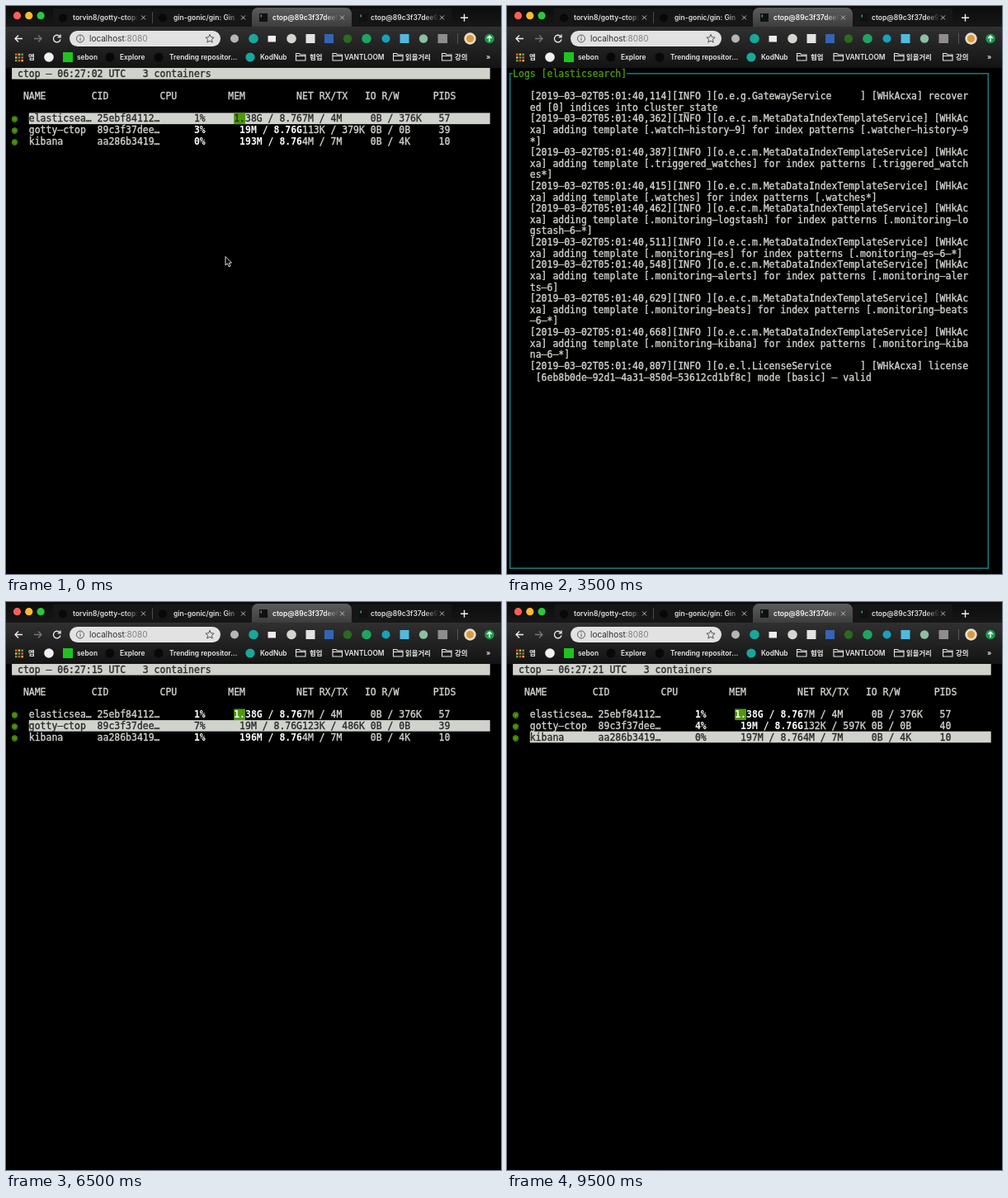
An HTML page with a canvas that plays this animation: 600 by 688 pixels, repeating every 10000 ms.

```html
<!DOCTYPE html>
<html lang="en">
<head>
<meta charset="utf-8">
<title>ctop</title>
<style>
  html, body { margin: 0; width: 100%; height: 100%; overflow: hidden; background: #000; }
  canvas { display: block; }
</style>
</head>
<body>
<canvas id="stage" width="600" height="688"></canvas>
<script>
const ctx = document.getElementById('stage').getContext('2d');
const CW = 6.9, RH = 13.62, LEFT = 0.2, TOP = 75;
const FG = '#d0d3cc', GREEN = '#4e9a06', CYAN = '#16898b', INK = '#2a2a2a';
const SANS = 'Inter, "Noto Sans CJK KR", "Noto Sans CJK", sans-serif';

const colX = c => LEFT + c * CW;
const rowY = r => TOP + r * RH;
const midX = c => colX(c + 0.5);
const midY = r => rowY(r + 0.5);

// ---------- basic shapes ----------
function rect(x, y, w, h, color) {
  ctx.fillStyle = color;
  ctx.fillRect(x, y, w, h);
}
function disc(x, y, r, color) {
  ctx.fillStyle = color;
  ctx.beginPath();
  ctx.arc(x, y, r, 0, 7);
  ctx.fill();
}
function stroke(path, color, width = 1) {
  ctx.strokeStyle = color;
  ctx.lineWidth = width;
  ctx.stroke(new Path2D(path));
}
function label(x, y, text, size, color, weight = 600) {
  ctx.font = `${weight} ${size}px ${SANS}`;
  ctx.fillStyle = color;
  ctx.fillText(text, x, y);
}
function vertical(y0, y1, from, to) {
  const g = ctx.createLinearGradient(0, y0, 0, y1);
  g.addColorStop(0, from);
  g.addColorStop(1, to);
  return g;
}

// ---------- terminal cells ----------
function cells(c, r, n, color, rows = 1) {
  rect(colX(c), rowY(r), n * CW, rows * RH, color);
}
// A hairline outline thickens the strokes; dashes take the wide glyph.
function put(c, r, text, color = FG, bold = false) {
  ctx.font = `${bold ? 'bold ' : ''}11.44px "DejaVu Sans Mono", monospace`;
  ctx.fillStyle = ctx.strokeStyle = color;
  ctx.lineWidth = 0.35;
  [...text.replaceAll('-', '–')].forEach((ch, i) => {
    if (ch === ' ') return;
    ctx.fillText(ch, colX(c + i), rowY(r) + 10.8);
    if (!bold) ctx.strokeText(ch, colX(c + i), rowY(r) + 10.8);
  });
}
function box(c0, r0, c1, r1, color, title = '') {
  ctx.strokeStyle = color;
  ctx.lineWidth = 1.4;
  ctx.strokeRect(midX(c0), midY(r0), (c1 - c0) * CW, (r1 - r0) * RH);
  cells(c0 + 1, r0, title.length, '#000');
  put(c0 + 1, r0, title, GREEN);
}

// ---------- browser window ----------
function tab(x, title, textX, active) {
  if (active) {
    ctx.fillStyle = vertical(2, 26, '#5c5c5c', '#3c3c3c');
    ctx.beginPath();
    ctx.roundRect(x, 2, 121, 24, [7, 7, 0, 0]);
    ctx.fill();
  }
  const fade = ctx.createLinearGradient(x + 88, 0, x + 105, 0);
  fade.addColorStop(0, active ? '#f4f4f4' : '#dcdcdc');
  fade.addColorStop(1, 'rgba(220,220,220,0)');
  label(textX, 17, title, 8.5, fade);
  stroke(`M${x + 107} 11.5l5 5m0 -5l-5 5`, '#bbb');
}
function folder(x) {
  stroke(`M${x} 57.5h4l1.5 1.5h6v7h-11.5zM${x} 60.5h11.5`, '#e4e4e4', 1.1);
}
function bookmark(x, text) {
  label(x, 65, text, 8.4, '#e8e8e8');
}

function browser() {
  rect(0, 0, 600, 26, vertical(0, 26, '#0c0c0c', '#171717'));
  ['#ff5f57', '#febc2e', '#28c840'].forEach((c, i) => disc(13.5 + i * 14.3, 11.7, 4.6, c));
  rect(57, 3, 120, 23, '#161616');
  rect(178, 3, 120, 23, '#161616');
  rect(419, 3, 121, 23, '#161616');
  rect(177, 7, 1, 14, '#4a4a4a');
  tab(57, 'torvin8/gotty-ctop:', 81, false);
  tab(178, 'gin-gonic/gin: Gin', 203, false);
  tab(298, 'ctop@89c3f37dee9', 323, true);
  tab(419, 'ctop@89c3f37dee9', 442, false);
  disc(69, 14.5, 5, '#080808');
  disc(190, 14.5, 5, '#080808');
  for (const x of [307, 428]) {
    rect(x, 9, 10, 10, '#111');
    rect(x + 1.5, 10.5, 1.5, 3, '#3aa76d');
  }
  stroke('M551 14.3h9M555.5 9.8v9', '#eee', 1.4);

  rect(0, 25, 600, 50, vertical(25, 75, '#303030', '#131313'));
  stroke('M20 39.5h-9M15 35.5l-4 4l4 4', '#eee', 1.3);
  stroke('M34 39.5h9M39 35.5l4 4l-4 4', '#777', 1.3);
  stroke('M65.4 37.2a4.3 4.3 0 1 0 .6 3.2', '#eee', 1.3);
  stroke('M66 34.5v3.4h-3.4', '#eee', 1.3);
  ctx.fillStyle = '#e2e2e2';
  ctx.beginPath();
  ctx.roundRect(77, 30, 183, 19, 9.5);
  ctx.fill();
  stroke('M94.5 39.5a4.5 4.5 0 1 0 -9 0a4.5 4.5 0 1 0 9 0M90 38.8v3.2M90 36.6v1.2', '#555');
  label(101, 43, 'localhost', 10, '#2d2d2d', 400);
  const hostWidth = ctx.measureText('localhost').width;
  label(101 + hostWidth, 43, ':8080', 10, '#808080', 400);
  stroke('M247 34.4l1.5 3.4l3.6 .3l-2.7 2.4l.8 3.6l-3.2 -1.9l-3.2 1.9l.8 -3.6l-2.7 -2.4l3.6 -.3z', '#555');

  disc(277, 39.5, 5, '#b5b5b5');
  disc(300, 39.5, 5.8, '#18a79b');
  rect(317.5, 36, 9.5, 7.5, '#eee');
  disc(346, 39.5, 5.8, '#d4d6d0');
  rect(363.5, 34, 11, 11, '#e2e2e2');
  rect(386, 34, 11, 11, '#3563b5');
  disc(414, 39.5, 5.2, '#2c6a1f');
  disc(437, 39.5, 5.8, '#1fa463');
  disc(460.5, 39.5, 5, '#15a3bd');
  rect(477.5, 34, 11, 11, '#52b9df');
  disc(506, 39.5, 5.2, '#8cc0a0');
  rect(523.5, 34, 11.5, 11, '#8d8d8d');
  rect(547, 33, 1, 13, '#555');
  disc(562.5, 39.5, 7.2, '#e9dfc9');
  disc(562.5, 39.5, 4.5, '#d99a3c');
  disc(586, 39.5, 5.8, '#1c9a4c');
  stroke('M586 43v-6.5M583.2 39l2.8 -2.8l2.8 2.8', '#fff', 1.4);

  const dots = ['#e5533d', '#e8b33a', '#58a55c'];
  for (let i = 0; i < 9; i++) {
    const row = Math.floor(i / 3);
    rect(11 + (i % 3) * 3.7, 57.5 + row * 3.7, 2.5, 2.5, dots[(i + row) % 3]);
  }
  disc(52, 62, 5.8, '#f1f1f1');
  rect(69, 56, 12, 12, '#1ec41e');
  disc(126, 62, 5.5, '#080808');
  disc(185, 62, 5.5, '#080808');
  disc(296, 62, 5.6, '#18a79b');
  [351.5, 396, 469.5, 528.5].forEach(folder);
  bookmark(27, '앱');
  bookmark(86, 'sebon');
  bookmark(138, 'Explore');
  bookmark(198, 'Trending repositor…');
  bookmark(308, 'KodNub');
  bookmark(368, '협업');
  bookmark(410, 'VANTLOOM');
  bookmark(484, '읽을거리');
  bookmark(544, '강의');
  bookmark(582, '»');
}

// ---------- container list ----------
function list(sec, selected, cpu, net, kibanaMem, pids = 39) {
  cells(1, 0, 84, FG);
  put(2, 0, `ctop - 06:27:${String(sec).padStart(2, '0')} UTC   3 containers`, INK);
  const heads = ['NAME', 'CID', 'CPU', 'MEM', 'NET RX/TX', 'IO R/W', 'PIDS'];
  heads.forEach((h, i) => put(3 + 12 * i, 2, h));
  const rows = [
    ['elasticsea…', '25ebf84112…', '1.38G / 8.76', '7M / 4M', '0B / 376K', 57],
    ['gotty-ctop', '89c3f37dee…', ' 19M / 8.76G', net, '0B / 0B', pids],
    ['kibana', 'aa286b3419…', ` ${kibanaMem}M / 8.76`, '4M / 7M', '0B / 4K', 10],
  ];
  rows.forEach(([name, cid, mem, traffic, io, procs], i) => {
    const r = 4 + i, on = i === selected;
    const color = on ? INK : FG, strong = on ? INK : '#fff';
    put(1, r, '◉', GREEN);
    if (on) cells(4, r, 81, FG);
    if (i === 0) cells(40, r, 2, GREEN);
    put(4, r, name, color);
    put(16, r, cid, color);
    put(33, r, cpu[i] + '%', strong, !on);
    put(40, r, mem, strong, !on);
    put(52, r, traffic, color);
    put(64, r, io, color);
    put(76, r, String(procs), color);
  });
}

function menu(selected) {
  cells(1, 0, 19, '#000', 10);
  box(1, 0, 19, 9, CYAN, 'Menu');
  ['single view', 'log view', 'stop', 'pause', 'restart', 'cancel'].forEach((item, i) => {
    const on = i === selected;
    if (on) cells(5, 2 + i, item.length, FG);
    put(5, 2 + i, item, on ? INK : FG);
  });
}

// ---------- single container ----------
const elastic = {
  info: [
    ['id', '25ebf84112c8'], ['name', 'elasticsearch'],
    ['image', 'docker.elastic.co/elasticsearch/elasticsearch:6.4.0'],
    ['ports', '9200/tcp'], ['', '9300/tcp'],
    ['', '0.0.0.0:19200 -> 19200/tcp'], ['', '0.0.0.0:19300 -> 19300/tcp'],
    ['IPs', 'elasticsearch-curator_ek:192.168.32.2'], ['state', 'running'],
    ['created', 'Sat Mar 2 05:01:21 2019'], ['health', ''],
  ],
  mem: '1.38G', gauge: true,
};
const gotty = {
  info: [
    ['id', '89c3f37dee9d'], ['name', 'gotty-ctop'], ['image', 'torvin8/ctop:latest'],
    ['ports', '0.0.0.0:8080 -> 8080/tcp'], ['IPs', 'gotty-ctop_default:192.168.144.2'],
    ['state', 'running'], ['created', 'Sat Mar 2 06:19:48 2019'], ['health', ''],
  ],
  mem: '19M', gauge: false,
};

// Levels 0..7 fill the newest columns; neighbours are joined by vertical runs of dots.
function cpuChart(base, levels, step) {
  const axisY = midY(base + 9);
  ctx.setLineDash([2.6, 0.8]);
  stroke(`M${midX(5)} ${rowY(base + 0.95)}V${axisY}`, '#ddd', 1.4);
  ctx.setLineDash([1.2, 1]);
  stroke(`M${midX(5)} ${axisY}H${colX(63)}`, '#ccc', 1.2);
  ctx.setLineDash([]);
  for (let i = 0; i < (step ? 4 : 1); i++) put(1, base + 9 - 2 * i, (i * step).toFixed(2), '#fff', true);

  const history = Array(55 - levels.length).fill(0).concat(levels);
  const dot = (i, level) => disc(midX(6 + i), midY(base + 8 - level), 1.7, GREEN);
  history.forEach((level, i) => {
    dot(i, level);
    if (!i) return;
    const prev = history[i - 1], low = Math.min(prev, level), high = Math.max(prev, level);
    const lowCol = prev < level ? i - 1 : i, highCol = 2 * i - 1 - lowCol;
    for (let l = low + 1; l < high; l++) dot(l < Math.floor((low + high) / 2) ? lowCol : highCol, l);
  });
}

function spark(r, heights) {
  heights.forEach((h, i) => {
    rect(colX(61 - heights.length + i), rowY(r + 1 - h / 8), CW, h / 8 * RH, GREEN);
  });
}

function detail({ info, mem, gauge }, levels, step, rx = '0b', tx = '0b', bars = []) {
  const base = info.length + 2, line = '#c4c4c4';
  box(0, 0, 64, base - 1, line);
  info.forEach(([key, value], i) => {
    put(3, i + 1, key);
    put(11, i + 1, '|');
    put(13, i + 1, value);
  });
  box(0, base, 64, base + 11, line, 'CPU');
  box(0, base + 12, 64, base + 24, line, 'MEM');
  box(0, base + 25, 64, base + 30, line, 'NET');
  box(0, base + 31, 64, base + 36, line, 'IO');
  cpuChart(base, levels, step);
  if (!levels.length) return;
  put(1, base + 13, mem + ' / 8.76G');
  cells(57, base + 15, 6, '#363636', 8);
  if (gauge) {
    cells(57, base + 22, 6, GREEN);
    put(57, base + 22, mem);
  }
  put(1, base + 26, `RX [${rx}/s]`);
  put(1, base + 28, `TX [${tx}/s]`);
  spark(base + 27, bars);
  spark(base + 29, bars);
  put(1, base + 32, 'read [0b/s]');
  put(1, base + 34, 'write [0b/s]');
}

// ---------- logs ----------
const esLine = (ms, service, text) => `[2019-03-02T05:01:40,${ms}][INFO ][${service}] [WHkAcxa] ${text}`;
const template = (ms, name, pattern) =>
  esLine(ms, 'o.e.c.m.MetaDataIndexTemplateService', `adding template [.${name}] for index patterns [.${pattern}]`);
const monitoring = (ms, name, end = '-6-*') => template(ms, 'monitoring-' + name, 'monitoring-' + name + end);
const elasticLogs = [
  esLine(114, 'o.e.g.GatewayService     ', 'recovered [0] indices into cluster_state'),
  template(362, 'watch-history-9', 'watcher-history-9*'),
  template(387, 'triggered_watches', 'triggered_watches*'),
  template(415, 'watches', 'watches*'),
  monitoring(462, 'logstash'),
  monitoring(511, 'es'),
  monitoring(548, 'alerts', '-6'),
  monitoring(629, 'beats'),
  monitoring(668, 'kibana'),
  esLine(807, 'o.e.l.LicenseService     ', 'license [6eb8b0de-92d1-4a31-850d-53612cd1bf8c] mode [basic] - valid'),
];

const jsonLine = (tags, rest, sec = 43) => JSON.stringify({
  type: 'log', '@timestamp': `2019-03-02T05:01:${sec}Z`, tags, pid: 1, ...rest,
});
const ready = plugin => jsonLine(['status', `plugin:${plugin}@6.4.0`, 'info'], {
  state: 'green', message: 'Status changed from red to green - Ready',
  prevState: 'red', prevMsg: 'No Living connections',
});
const kibanaLogs = [
  ...['watcher', 'index_management', 'graph', 'grokdebugger', 'logstash', 'reporting'].map(ready),
  jsonLine(['info', 'monitoring-ui', 'kibana-monitoring'], { message: 'Starting monitoring stats collection' }),
  ready('security'),
  jsonLine(['license', 'info', 'xpack'], {
    message: 'Imported license information from Elasticsearch for the [monitoring] cluster: mode: basic | status: active',
  }),
  jsonLine(['info', 'http', 'server', 'listening'], { message: 'Server running at http://0:5601' }, 52),
];

function logs(name, lines) {
  box(0, 0, 84, 44, CYAN, `Logs [${name}]`);
  lines.flatMap(l => l.match(/.{1,77}/g)).forEach((l, i) => put(4, 2 + i, l));
}

function pointer() {
  const arrow = new Path2D('M266 303.5v10.5l2.4 -2.2l1.7 4l1.9 -.8l-1.7 -3.9h3.2z');
  ctx.fillStyle = '#000';
  ctx.fill(arrow);
  ctx.strokeStyle = '#ddd';
  ctx.lineWidth = 1;
  ctx.stroke(arrow);
}

// ---------- timeline ----------
const menuOver = item => {
  list(16, 2, [1, 5, 1], '124K / 497K', 196);
  menu(item);
};
const steps = [
  [0, () => { list(2, 0, [1, 3, 0], '113K / 379K', 193); pointer(); }],
  [500, () => list(3, 0, [1, 4, 0], '114K / 388K', 193)],
  [1000, () => detail(elastic, [], 0)],
  [1500, () => detail(elastic, [7], 0.6)],
  [2000, () => detail(elastic, [7, 1], 0.6, '66b', '66b', [8])],
  [2500, () => detail(elastic, [7, 1, 2], 0.6, '0b', '0b', [8, 0])],
  [3000, () => list(8, 0, [1, 4, 0], '117K / 428K', 194)],
  [3500, () => logs('elasticsearch', elasticLogs)],
  [4000, () => list(10, 1, [1, 4, 0], '119K / 445K', 195)],
  [4500, () => detail(gotty, [], 0)],
  [5000, () => detail(gotty, [7], 0.9)],
  [5500, () => detail(gotty, [7, 5], 0.9, '1k', '9k', [8])],
  [6000, () => detail(gotty, [4, 3, 7], 1.5, '1k', '8k', [8, 7])],
  [6500, () => list(15, 1, [1, 7, 1], '123K / 486K', 196)],
  [7000, () => menuOver(0)],
  [7500, () => menuOver(1)],
  [8000, () => logs('kibana', kibanaLogs)],
  [9500, () => list(21, 2, [1, 4, 0], '132K / 597K', 197, 40)],
];

let shown = null;
function tick() {
  const t = performance.now() % 10000;
  const step = steps.findLast(([start]) => start <= t);
  if (step !== shown) {
    shown = step;
    rect(0, 0, 600, 688, '#000');
    step[1]();
    browser();
  }
  requestAnimationFrame(tick);
}
tick();
</script>
</body>
</html>
```
